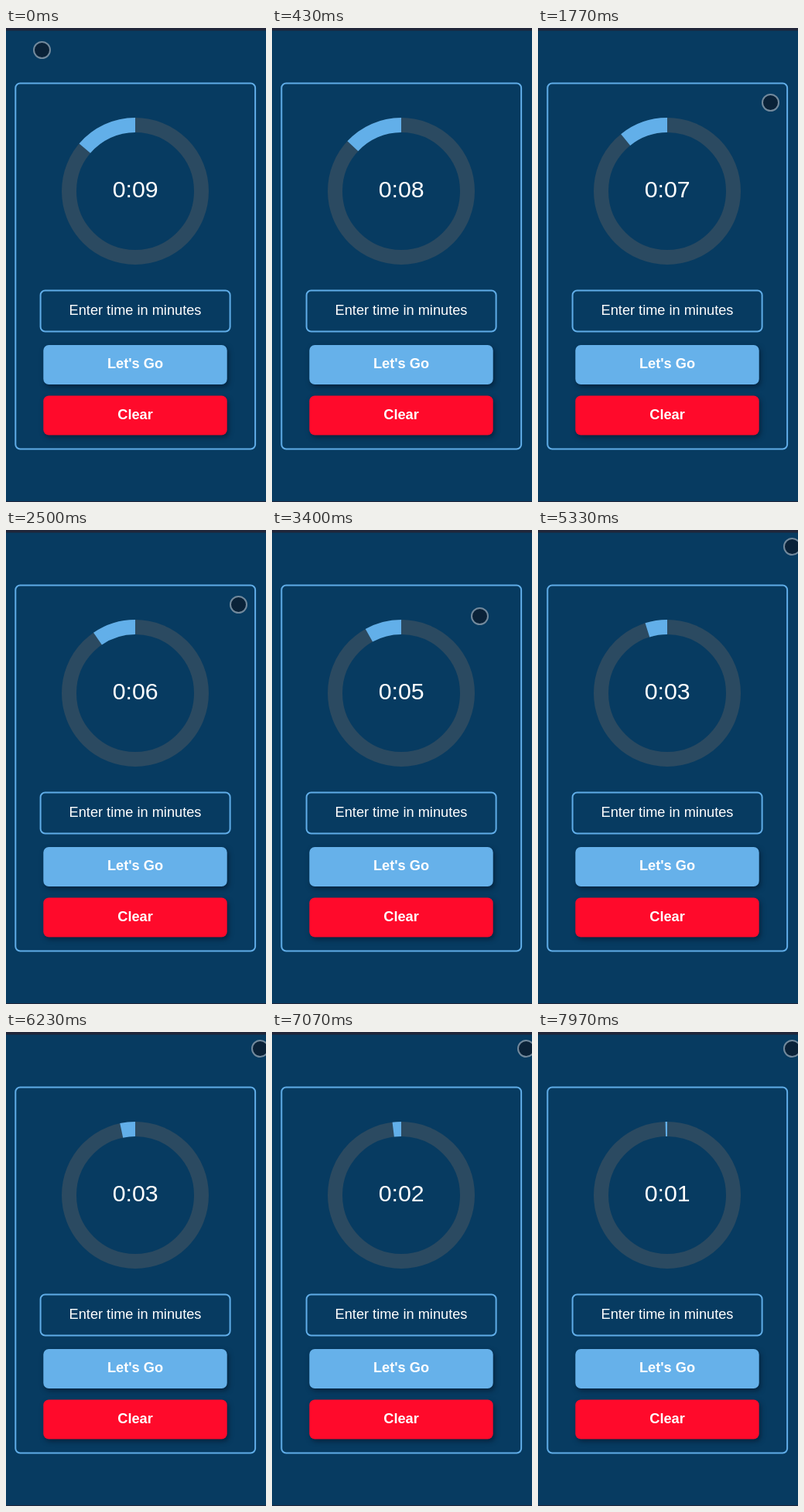
An HTML page that plays this animation: 336 px wide and 613 px high, repeating every 8000 ms.

```html
<!DOCTYPE html>
<html lang="en">
<head>
<meta charset="utf-8">
<title>Countdown</title>
<style>
  html, body { margin: 0; width: 100%; height: 100%; overflow: hidden; background: #073b61; }
  svg { display: block; width: 336px; height: 613px; }
  text { font-family: "Liberation Sans", Arial, sans-serif; font-size: 18.2px; fill: #fff; text-anchor: middle; }
  .bold { font-weight: bold; }
  .time { font-size: 30.3px; }
  .line { fill: none; stroke: #60ade8; stroke-width: 2; }
  .btn { filter: drop-shadow(2px 3px 3px rgba(0, 10, 25, .5)); }
</style>
</head>
<body>
<svg viewBox="0 0 336 613">
  <rect width="336" height="613" fill="#073b61"/>
  <rect width="336" height="3.5" fill="#20263a"/>
  <rect y="612" width="336" height="1" fill="#20263a"/>

  <rect class="line" x="12.3" y="71.5" width="309.8" height="473" rx="6"/>

  <circle cx="167" cy="211" r="85.5" fill="none" stroke="#2b4a61" stroke-width="19"/>
  <path id="arc" fill="none" stroke="#62afe9" stroke-width="19"/>
  <text id="time" class="time" x="167.2" y="219.4">0:09</text>

  <rect class="line" x="44.6" y="339.5" width="245" height="53" rx="6"/>
  <text x="167" y="371">Enter time in minutes</text>

  <rect class="btn" x="48.3" y="410" width="237.4" height="51" rx="7" fill="#66b1ea"/>
  <text class="bold" x="167" y="440">Let's Go</text>
  <rect class="btn" x="48.3" y="475.4" width="237.4" height="51.2" rx="7" fill="#ff0a2b"/>
  <text class="bold" x="167" y="506">Clear</text>

  <circle id="pointer" r="10.5" fill="#0a2238" stroke="#72899c" stroke-width="2"/>
</svg>
<script>
  const LOOP = 8000, CX = 167, CY = 211, R = 85.5, GLIDE = 400;
  const [arc, time, pointer] = ["arc", "time", "pointer"].map(id => document.getElementById(id));

  // places the pointer glides to: arrival ms, x, y
  const stops = [
    [830, 306.5, 104], [1700, 300.5, 96.5], [3300, 268.5, 111.5],
    [3800, 308.5, 69.5], [4400, 333.5, 24.5], [4900, 328.5, 21.5]
  ];

  function ease(k) {
    k = Math.min(1, Math.max(0, k));
    return k * k * (3 - 2 * k);
  }

  function pointerAt(t) {
    if (t < 30) return [46.5, 28.5];
    return stops.reduce(([px, py], [end, x, y]) => {
      const k = ease(1 + (t - end) / GLIDE);
      return [px + (x - px) * k, py + (y - py) * k];
    }, [321.5, 112]);
  }

  function draw(t) {
    // the ring holds still for a moment after 870 ms, then catches up
    const live = t > 870 && t < 1300 ? 870 : t;
    const a = (49.7 - 6.05 * live / 1000) * Math.PI / 180;
    arc.setAttribute("d",
      `M${CX} ${CY - R}A${R} ${R} 0 0 0 ${CX - R * Math.sin(a)} ${CY - R * Math.cos(a)}`);

    time.textContent = "0:0" + (9 - Math.floor((t + 670) / 1000));

    pointer.style.display = t < 30 || t > 500 ? "" : "none";
    pointer.setAttribute("transform", `translate(${pointerAt(t)})`);
  }

  function tick() {
    draw(performance.now() % LOOP);
    requestAnimationFrame(tick);
  }
  tick();
</script>
</body>
</html>
```
